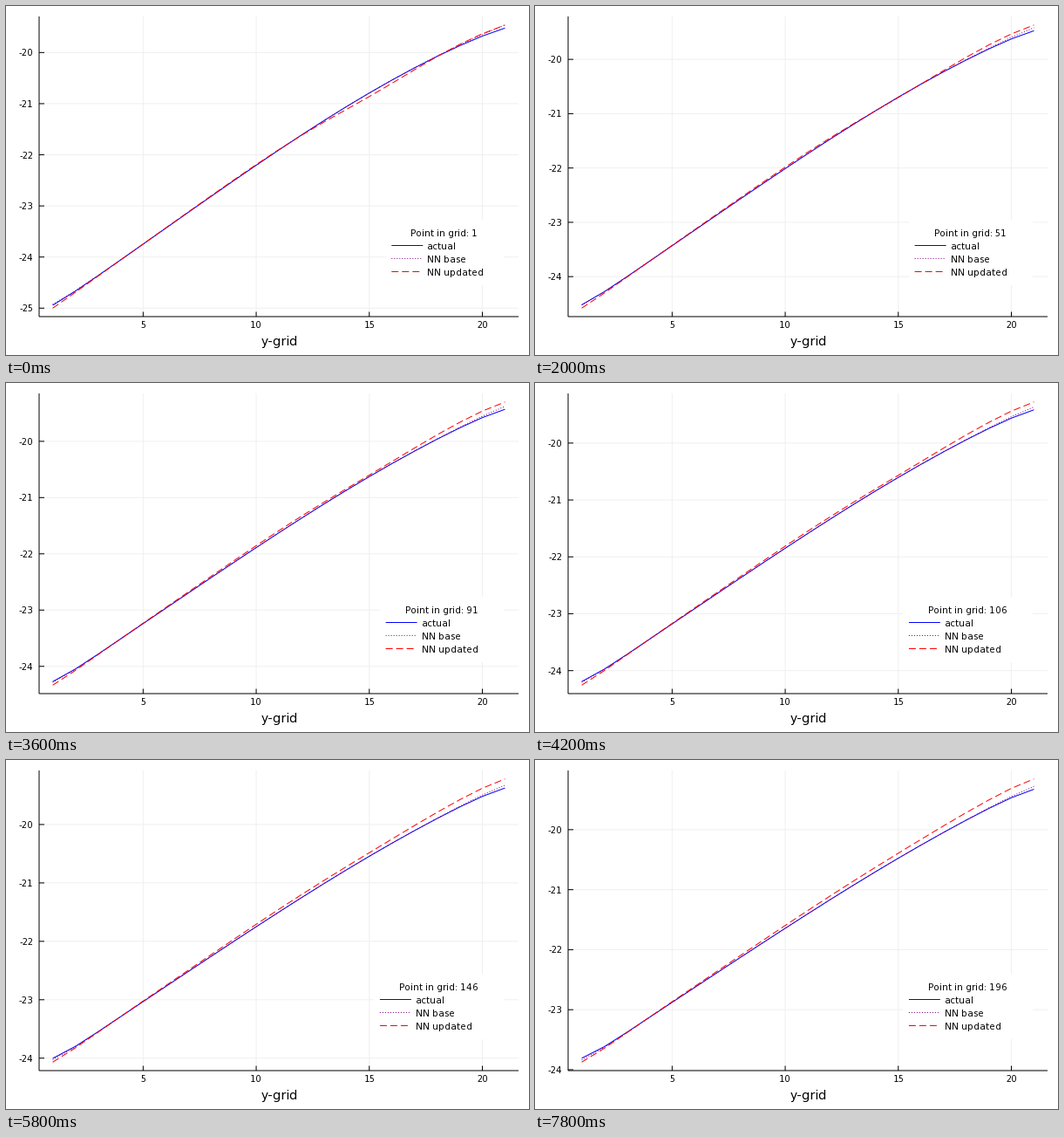
These frames come from a looping animation (600x400 px, 8 s). A matplotlib script:

```python
import numpy as np
import matplotlib.pyplot as plt
from matplotlib.animation import FuncAnimation
from matplotlib.patches import Rectangle

W, H, DPI = 600, 400, 100
LEFT, RIGHT, TOP, BOTTOM = 38, 588, 12, 356
DATA_TOP, DATA_BOTTOM = 21.7, 346.3
FRAMES, INTERVAL = 40, 200
PX = 72 / DPI
SMALL, LARGE = 10.5 * PX, 14.4 * PX

plt.rcParams["font.family"] = "DejaVu Sans"
plt.rcParams["text.hinting_factor"] = 1  # whole-pixel letter spacing

GRID_Y = np.arange(1, 22)
U = (GRID_Y - 1) / 20
NEAR_START = np.exp(-U / 0.06)
NEAR_END = np.exp(-(1 - U) / 0.07)


def x_px(x):
    return LEFT + (x - 0.4) / 21.2 * (RIGHT - LEFT)


def value_range(n):
    """Lowest and highest plotted value at grid point n."""
    m = n - 1
    return -25 + 1.06 * np.log1p(m / 103), -19.46 + 0.61 * np.log1p(m / 300)


def heights(n):
    """Pixel heights of the three curves at grid point n."""
    p = np.log1p((n - 1) / 103) / np.log1p(195 / 103)
    first, last = 343 - 1.2 * p, 25.3 + 8.2 * p
    bend = (20 - 18 * p + (113 - 26 * p) * U
            - (45 + 75 * p) * NEAR_START + (28 + 42 * p) * NEAR_END)
    actual = first + (last - first) * U - U * (1 - U) * bend

    base = actual + (3 * p - 1) * NEAR_START + (0.6 * p - 3.7) * NEAR_END

    sag = 6.2 * (1 - 0.85 * p) * np.exp(-((U - 0.72) / 0.15) ** 2)
    updated = (actual + (3.3 + 1.2 * p) * NEAR_START
               - (3.6 + 8.2 * p) * U ** 1.6 + sag)
    return actual, base, updated


fig = plt.figure(figsize=(W / DPI, H / DPI), dpi=DPI, facecolor="white")
ax = fig.add_axes([0, 0, 1, 1])
ax.set_xlim(0, W)
ax.set_ylim(H, 0)
ax.axis("off")


def line(xs, ys, color="black", z=3, **kw):
    return ax.plot(xs, ys, color=color, lw=PX, zorder=z, snap=False,
                   solid_capstyle="butt", dash_capstyle="butt", **kw)[0]


def label(x, y, s, ha="center", size=SMALL):
    return ax.text(x, y, s, ha=ha, va="baseline", fontsize=size,
                   color="black", zorder=6)


# Fixed axes
line([LEFT, LEFT], [TOP, BOTTOM])
line([LEFT, RIGHT], [BOTTOM, BOTTOM])
for v in range(5, 21, 5):
    gx = x_px(v)
    line([gx, gx], [TOP, BOTTOM], "#f0f0f0", 1)
    line([gx, gx], [BOTTOM, BOTTOM - 5.5])
    label(gx, 369, str(v))
label(313.5, 389, "y-grid", size=LARGE)

# Moving vertical scale
ticks = []
for v in range(-25, -18):
    ticks.append((v, line([LEFT, RIGHT], [0, 0], "#f0f0f0", 1),
                  line([LEFT, LEFT + 6], [0, 0]),
                  label(32, 0, str(v), "right")))

# Curves and legend
STYLES = [("actual", "blue", "-"),
          ("NN base", "purple", (0, (1, 2))),
          ("NN updated", "red", (0, (8, 4)))]
curves = [line(x_px(GRID_Y), 0 * GRID_Y, c, 4, ls=s) for _, c, s in STYLES]

box = ax.add_patch(Rectangle((436, 244.5), 135, 75, fc="white", ec="none",
                             zorder=5))
title = label(503, 264, "")
keys = []
for k, (name, c, s) in enumerate(STYLES):
    y = 274.5 + 15 * k
    keys.append((line([0, 1], [y, y], c, 6, ls=s),
                 label(0, y + 4.4, name, "left")))


def update(i):
    n = 1 + 5 * i
    low, high = value_range(n)
    scale = (DATA_BOTTOM - DATA_TOP) / (high - low)
    for v, grid, mark, text in ticks:
        y = DATA_TOP + (high - v) * scale
        grid.set_ydata([y, y])
        mark.set_ydata([y, y])
        text.set_y(y + 4)
        for part in (grid, mark, text):
            part.set_visible(TOP <= y <= BOTTOM)

    for curve, ys in zip(curves, heights(n)):
        curve.set_ydata(ys)

    # The legend widens to the left with every extra digit
    x0 = 442.3 - 6.7 * (len(str(n)) - 1)
    box.set_x(x0 - 6.5)
    box.set_width(571 - box.get_x())
    title.set_text(f"Point in grid: {n}")
    title.set_x((x0 + 563.5) / 2)
    for key, text in keys:
        key.set_xdata([x0, x0 + 36])
        text.set_x(x0 + 41)
    return []


anim = FuncAnimation(fig, update, frames=FRAMES, interval=INTERVAL,
                     init_func=lambda: update(0), repeat=True, repeat_delay=0)
plt.show()
```
